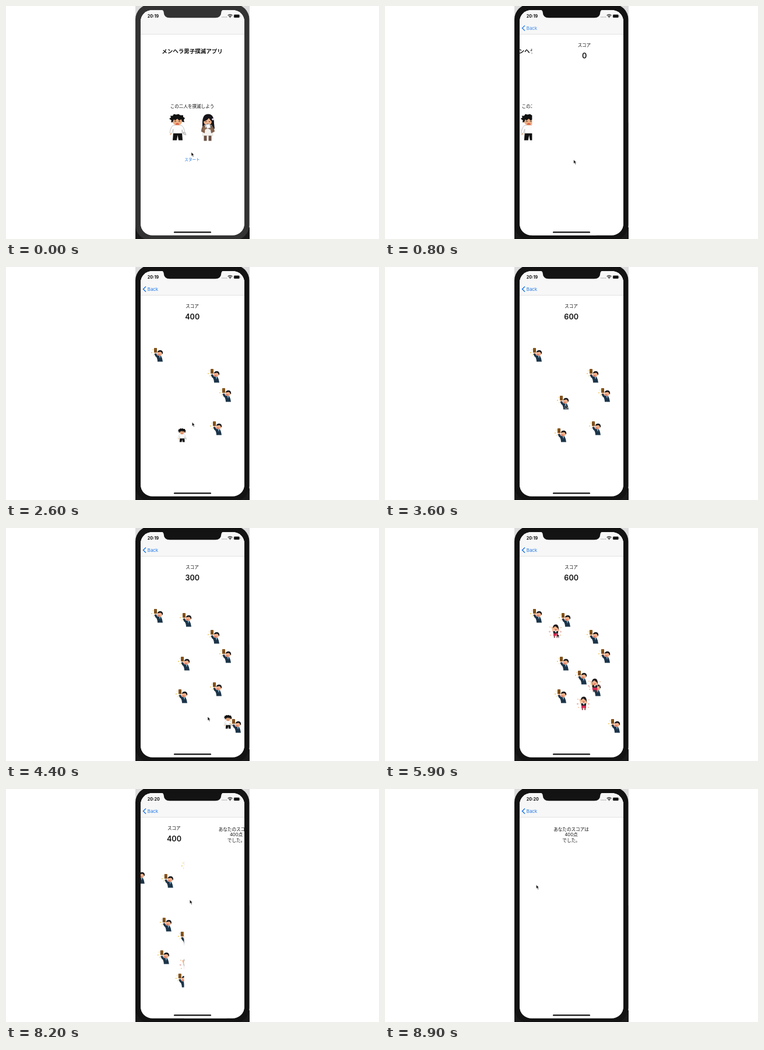
These frames come from a looping animation (640x400 px, 9000 ms). An HTML page:

```html
<!DOCTYPE html>
<html lang="ja">
<head>
<meta charset="utf-8">
<style>
html, body { margin: 0; width: 100%; height: 100%; overflow: hidden; background: #fff; }
svg { display: block; width: 640px; height: 400px; }
text { font-family: Inter, "Noto Sans CJK JP", "Noto Sans CJK", sans-serif; fill: #111; }
.mid { text-anchor: middle; }
.blue { fill: #1f78e6; }
</style>
</head>
<body>
<svg viewBox="0 0 640 400">
<defs>
  <clipPath id="screen"><rect x="231" y="7" width="178" height="386.5" rx="20"/></clipPath>
  <clipPath id="crop"><rect x="222" y="0" width="196" height="400"/></clipPath>

  <!-- man raising a trophy -->
  <g id="man">
    <g fill="#efc14a"><circle cx="-10" cy="-4" r=".9"/><circle cx="-8" cy="-9" r=".7"/><circle cx="-7" cy="0" r=".7"/></g>
    <path d="M-4-2.500L-2 1.500L2 3.500" fill="none" stroke="#1b3449" stroke-width="3.600" stroke-linejoin="round"/>
    <path d="M-3.500 1L1 1L6 1.500Q8.500 6 9 11.500H0Q0 5.500-3.500 1Z" fill="#1b3449"/>
    <rect x="-6" y="-12" width="5" height="8" rx=".7" fill="#7d4c17"/>
    <path d="M-4.500-10h2" stroke="#b77f30" stroke-width=".8"/>
    <circle cx="-4" cy="-3.300" r="1.300" fill="#efb58c"/>
    <ellipse cx="3.700" cy="-2.500" rx="4.500" ry="4" fill="#f2b08a"/>
    <path d="M-.5-4.500Q1-8.500 5-8.200Q9.500-7.500 9.200-2.500L8-1.500Q7.500-5 5-5.500Z" fill="#17191c"/>
    <path d="M2.500-1H5Q3.800 1-2.500-1Z" fill="#c6443c"/>
    <path d="M2.800 2L4.200 6L5 2Z" fill="#8fc0dc"/>
  </g>

  <!-- cheering girl -->
  <g id="cheer">
    <g fill="#e69a58"><circle cx="-9" cy="-7" r=".8"/><circle cx="10" cy="-6" r=".8"/><circle cx="-8" cy="7" r=".8"/><circle cx="9" cy="7" r=".8"/></g>
    <g fill="none" stroke="#d98e8e" stroke-width=".8"><circle cx="-9.500" cy="1" r="1"/><circle cx="9.500" cy="1" r="1"/></g>
    <path d="M-3 1.500L-5.500-6.500M4.500 1L6-2.500" stroke="#efb58c" stroke-width="2" stroke-linecap="round"/>
    <ellipse cx="1" cy="-5" rx="4.500" ry="4.800" fill="#f3b08a"/>
    <path d="M-4-5Q-4-11.500 1-11.500Q6.500-11.500 6-2L4.500-5L0-8.500Z" fill="#1d191b"/>
    <path d="M-.5-3H2.500Q1 0-.5-3Z" fill="#cc3e45"/>
    <path d="M-3.500 0H5V4.500H-3Z" fill="#24262c"/>
    <path d="M-.5 0H2.500L1 3Z" fill="#efeae6"/>
    <path d="M-3 4H5V8.500H1.500L1 6.500L.5 8.500H-3Z" fill="#d3264f"/>
    <path d="M-1.300 8.500v3M3.200 8.500v3" stroke="#7b3130" stroke-width="1.800"/>
  </g>

  <!-- messy-haired boy -->
  <g id="boy">
    <path d="M-7 9H8L9 22H2L.5 13L-1 22H-8Z" fill="#111"/>
    <path d="M-6-4H6Q11-3 13 9L10 11L8 4V10H-7V3L-10 11L-13 9Q-11-3-6-4Z" fill="#fcfcfc" stroke="#aaa" stroke-width=".7"/>
    <path d="M-11 10l-1 3M11 9l2 3" stroke="#efb48b" stroke-width="2"/>
    <path d="M10 8l4 1l1 4l-4-1Z" fill="#d7d7dc" stroke="#999" stroke-width=".5"/>
    <ellipse cx="0" cy="-11" rx="8.500" ry="7.500" fill="#efaf82"/>
    <path d="M-11-9L-10-12L-14-15L-11-17L-12-20L-8-20L-6-23L-2-22L2-23L5-21L10-21L10-18L13-16L11-13L12-9L8-10L7-14L3-12L0-15L-4-12L-6-14L-8-9Z" fill="#111"/>
    <path d="M-5-10.500h3M2-10.500h3" stroke="#333"/>
    <path d="M-3-6Q0-8.500 3-6V-5H-3Z" fill="#d34b3b"/>
  </g>

  <!-- long-haired girl -->
  <g id="girl">
    <path d="M-9-8Q-9-23 1-23Q11-23 11-7L12 2L6 4L-9 2Z" fill="#17151a"/>
    <path d="M-4 13v10M4 13v10" stroke="#6b5044" stroke-width="5"/>
    <path d="M-6-4H7L9 14H-9Z" fill="#f4f1ee" stroke="#c9c2bd" stroke-width=".5"/>
    <path d="M-6-4Q-11-1-11 7L-5 10L-4-3ZM6-4Q11-1 12 7L6 10L4-3Z" fill="#80604a"/>
    <path d="M-8 4L0 0L8 4" fill="none" stroke="#8d6b54" stroke-width="3"/>
    <ellipse cx="0" cy="-10.500" rx="7" ry="7" fill="#efb48d"/>
    <path d="M-8-10Q-6-20 2-20Q8-18 8-9Q4-13 2-16Q-2-11-8-10Z" fill="#17151a"/>
    <path d="M-4-10h2.500M2-10h2.500M-1-6h3" stroke="#633"/>
    <path d="M-3-5L3-6L5 0L-1 2Z" fill="#fff" stroke="#9eb4c4" stroke-width=".8"/>
    <circle cx="9" cy="-14" r="1.800" fill="#e3e1ea"/>
  </g>
  <rect id="sheet" x="230" y="7" width="180" height="387" fill="#fff"/>
</defs>

<g clip-path="url(#crop)">
  <rect x="222" width="196" height="200" fill="#dcdcdc"/>
  <rect x="222" y="200" width="196" height="200" fill="#1a1a1a"/>
  <path d="M417.700 20V380" stroke="#dcdcdc"/>
  <rect class="shell" x="222" y="-3" width="195.500" height="405" rx="26"/>
</g>
<g clip-path="url(#screen)">
  <use href="#sheet"/>
  <g id="home">
    <use href="#sheet"/>
    <text class="mid" x="319.500" y="80.500" font-size="9.500" font-weight="700">メンヘラ男子撲滅アプリ</text>
    <text class="mid" x="319.500" y="175.300" font-size="7.550">この二人を撲滅しよう</text>
    <use href="#boy" x="294" y="208.500"/>
    <use href="#girl" x="346" y="208.500"/>
    <text class="mid" x="319.500" y="266.200" font-size="6.600"><tspan class="blue">スタート</tspan></text>
  </g>
  <g id="game">
    <use href="#sheet"/>
    <text class="mid" x="319.500" y="70.300" font-size="7.500">スコア</text>
    <text class="mid" id="score" x="319.700" y="90.300" font-size="12.600" font-weight="600"></text>
    <g id="field"></g>
  </g>
  <g id="result">
    <use href="#sheet"/>
    <g class="mid" font-size="7.600">
      <text x="319.500" y="71.700">あなたのスコアは</text>
      <text x="319.500" y="81.200">400点</text>
      <text x="319.500" y="90.500">でした。</text>
    </g>
  </g>
  <rect x="230" y="7" width="180" height="41" fill="#f7f7f7"/>
  <path d="M230 48.500H410" stroke="#dcdcdc" stroke-width=".8"/>
  <g id="back">
    <path d="M240 33.500L235.500 38L240 42.500" fill="none" stroke="#1f78e6" stroke-width="1.500"/>
    <text class="blue" x="242.800" y="41" font-size="7.800">Back</text>
  </g>
  <text id="clock" x="242.800" y="20" font-size="7.100" font-weight="700"></text>
  <path d="M371 19H379" stroke="#888" stroke-width="1.400" stroke-linecap="round" stroke-dasharray="0 2.500"/>
  <path d="M380.700 16.200Q384.500 13 388.300 16.200M382.400 18Q384.500 16.300 386.600 18" fill="none" stroke="#111" stroke-width="1.300"/>
  <circle cx="384.500" cy="19.300" r=".9" fill="#111"/>
  <rect x="391" y="14.800" width="9.600" height="5.200" rx="1.300" fill="#111" stroke="#888" stroke-width=".5"/>
  <path d="M401.800 16.300v2" stroke="#888" stroke-width=".9"/>
  <rect x="288" y="387.200" width="64" height="2.400" rx="1.200" fill="#111"/>
</g>
<path class="shell" d="M267 6.500Q270 7 270.500 10Q271 20.300 281 20.300H359Q369 20.300 369.500 10Q370 7 373 6.500Z"/>
<path id="cursor" d="M0 0V6.600L1.600 5.200L2.800 8L4 7.500L2.800 4.800H4.800Z" fill="#111" stroke="#fff" stroke-width=".5"/>
</svg>
<script>
const $ = id => document.getElementById(id);
const LOOP = 9000, STEP = 100, LEAD = 200, DWELL = 200;
const PLAY = 600, END = 8100, SLIDE = 400;

// Each stop of the pointer in order of time; a boy or girl waits at most of them.
const stop = (x, y, at, kind, gone = LOOP) => ({ x, y, at, kind, gone });
const stops = [
  stop(315, 247, 0), stop(316, 258, 500),
  stop(361, 277, 1200, 'boy'), stop(377, 220, 1400, 'boy'), stop(260, 151, 1600, 'boy'),
  stop(357, 187, 2200, 'boy'), stop(302, 289, 2700, 'boy'), stop(306, 233, 3400, 'boy'),
  stop(309, 158, 3900, 'boy'), stop(394, 340, 4200, 'boy'), stop(343, 320, 4400),
  stop(337, 257, 4700, 'boy'), stop(359, 270, 5200, 'girl'), stop(340, 301, 5500, 'girl'),
  stop(292, 177, 5900, 'girl', 6100), stop(343, 136, 6300, 'boy'), stop(364, 163, 6600, 'boy'),
  stop(333, 329, 6900, 'boy'), stop(368, 212, 7500, 'girl'), stop(256.5, 160.5, 8700)
];
const missed = { x: 381, y: 333, from: 4300, to: 4900 };
const fines = [{ at: 4300, cost: 500 }, { at: 7000, cost: 600 }];

const clamp = p => Math.max(0, Math.min(1, p));
const smooth = p => p * p * (3 - 2 * p);
const ramp = (t, from) => 1 - (1 - clamp((t - from) / SLIDE)) ** 3;

function pointer(t) {
  const i = stops.findLastIndex(s => s.at <= t);
  const a = stops[i], b = stops[i + 1] || a;
  const gap = b.at - a.at, rest = Math.min(DWELL, gap / 2);
  const p = smooth(clamp((t - a.at - rest) / (gap - rest || 1)));
  return [a.x + (b.x - a.x) * p + 3, a.y + (b.y - a.y) * p + 4];
}

function score(t) {
  const hits = stops.filter(s => s.kind && s.at < t && t < s.gone).length;
  return fines.reduce((sum, f) => sum - (f.at <= t ? f.cost : 0), hits * 100);
}

const stamp = (id, { x, y }, size = 1) =>
  `<use href="#${id}" transform="translate(${x} ${y}) scale(${size})"/>`;

function field(t) {
  let waiting = '', men = '', cheers = '';
  for (const s of stops) {
    if (!s.kind || t < s.at - LEAD || t >= s.gone) continue;
    if (t < s.at) waiting += stamp(s.kind, s, 0.52);
    else if (s.kind === 'boy') men += stamp('man', s);
    else cheers += stamp('cheer', s);
  }
  if (t >= missed.from && t < missed.to) waiting += stamp('boy', missed, 0.52);
  return waiting + men + cheers;
}

function page(id, enter, leave) {
  const x = 179 * (1 - enter) - 54 * leave;
  $(id).setAttribute('transform', `translate(${x} 0)`);
  $(id).style.display = enter > 0 && leave < 1 ? '' : 'none';
}

let last = -1;
function draw(t) {
  if (t === last) return;
  last = t;
  const play = ramp(t, PLAY), end = ramp(t, END);
  page('home', 1, play);
  page('game', play, end);
  page('result', end, 0);
  $('back').style.opacity = play;
  document.querySelectorAll('.shell').forEach(el => el.setAttribute('fill', t < PLAY ? '#333' : '#131313'));
  $('clock').textContent = t < END ? '20:19' : '20:20';
  $('score').textContent = score(t);
  $('field').innerHTML = field(t);
  $('cursor').setAttribute('transform', `translate(${pointer(t)})`);
}

function tick() {
  draw(Math.floor(performance.now() % LOOP / STEP) * STEP);
  requestAnimationFrame(tick);
}
tick();
</script>
</body>
</html>
```
